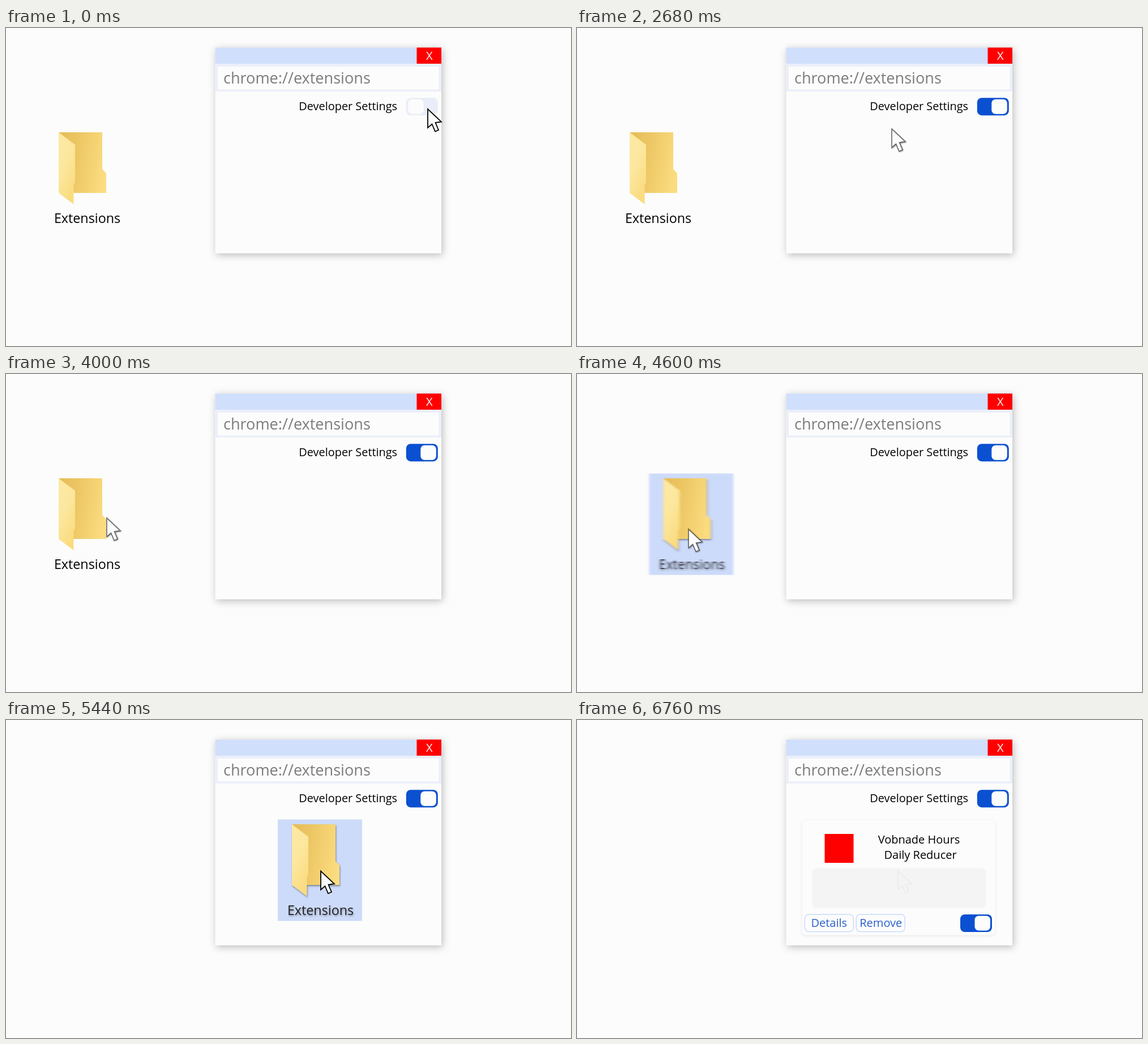
These frames come from a looping animation (998 by 561 pixels, 9600 ms). An HTML page:

```html
<!DOCTYPE html>
<html lang="en">
<head>
<meta charset="utf-8">
<title>Installing an extension</title>
<style>
  html, body { margin: 0; width: 100%; height: 100%; overflow: hidden; background: #fcfcfc; }
  svg { display: block; width: 998px; height: 561px; --track: #0b50d0; --shift: 0; }
  text { font: 20px "Open Sans", "Noto Sans", sans-serif; fill: #000; }
  .mid { text-anchor: middle; }
  .button rect { fill: #fcfcfc; stroke: #c8dbf9; stroke-width: 1.5; }
  .button text { fill: #2a5fcb; }
  .off { --track: #e9edf7; --shift: -22px; }
  .track { fill: var(--track); }
  .knob { fill: #fcfcfc; transform: translateX(var(--shift)); }
  .window { filter: drop-shadow(2px 3px 7px rgba(0, 0, 0, .26)); }
  .card-base { fill: #fcfcfc; filter: drop-shadow(0 1px 2px rgba(0, 0, 0, .09)); }
  .dragged .icon { filter: drop-shadow(1.5px 2px 1.5px rgba(0, 0, 0, .4)); }
  .dragged text { fill: #222; filter: drop-shadow(1px 2px 1.5px rgba(0, 0, 0, .35)) blur(.4px); }
  .moving { filter: drop-shadow(1.5px 1px 1.2px rgba(0, 0, 0, .45)); stroke-opacity: .5; }
</style>
</head>
<body>
<svg viewBox="0 0 998 561">
  <defs>
    <linearGradient id="back" x1="0" y1=".4" x2="1" y2=".6">
      <stop offset="0" stop-color="#e7bd59"/>
      <stop offset=".4" stop-color="#eec866"/>
      <stop offset="1" stop-color="#fbdd80"/>
    </linearGradient>
    <linearGradient id="flap" x1="0" y1="0" x2=".5" y2="1">
      <stop offset="0" stop-color="#fde9a4"/>
      <stop offset=".5" stop-color="#fce79e"/>
      <stop offset="1" stop-color="#fadc80"/>
    </linearGradient>
    <filter id="smear" x="-10%" y="-5%" width="120%" height="110%">
      <feGaussianBlur id="smearBlur" stdDeviation="0 0"/>
    </filter>
    <g id="toggle">
      <rect class="track" width="56" height="31" rx="8"/>
      <rect class="knob" x="25.500" y="2.500" width="27.500" height="26" rx="7"/>
    </g>
  </defs>

  <rect width="998" height="561" fill="#fcfcfc"/>

  <rect class="window" x="369.500" y="34.500" width="399.500" height="363" fill="#fcfcfc"/>
  <rect x="369.500" y="34.500" width="399.500" height="28.500" fill="#d0dffb"/>
  <rect x="725.500" y="34.500" width="43.500" height="28.500" fill="#f00"/>
  <text class="mid" x="747.800" y="55.500" style="fill:#fff">X</text>
  <rect x="369.500" y="63" width="399.500" height="49" fill="#ebeffa"/>
  <rect x="374" y="68" width="390.500" height="40.500" fill="#fcfcfc"/>
  <text x="384" y="98.300" style="font-size:27.1px;fill:#7c7c7c">chrome://extensions</text>
  <text x="517.300" y="144.500" style="font-size:19.9px">Developer Settings</text>
  <use id="devToggle" class="off" href="#toggle" x="706.800" y="123.200"/>

  <g id="folder">
    <rect id="selection" x="68" y="175.500" width="149" height="179" fill="#cad9fa" fill-opacity=".93"/>
    <g class="icon">
      <path d="M93 184H170V249L177 256V291H93Z" fill="url(#back)"/>
      <path d="M93 184L122 206V272L119.500 277V311L93 291Z" fill="url(#flap)"/>
    </g>
    <text class="mid" x="143.500" y="343.500" style="font-size:23.3px">Extensions</text>
  </g>

  <g id="card">
    <rect class="card-base" x="397.500" y="176.500" width="341" height="203" rx="8"/>
    <rect x="437.500" y="201" width="51" height="51" fill="#f00"/>
    <text class="mid" x="604" y="217.500">Vobnade Hours</text>
    <text class="mid" x="606.500" y="244.700">Daily Reducer</text>
    <rect x="415" y="261.500" width="307.500" height="70.500" rx="7" fill="#f4f4f4"/>
    <g class="button">
      <rect x="402.300" y="343" width="86" height="30.500" rx="7"/>
      <text class="mid" x="445.300" y="364.500">Details</text>
    </g>
    <g class="button">
      <rect x="493.300" y="343" width="86" height="30.500" rx="7"/>
      <text class="mid" x="536.800" y="364.500">Remove</text>
    </g>
    <use href="#toggle" x="677" y="343"/>
  </g>

  <g id="cursor">
    <path id="arrow" d="M0 0V33L7.500 26.500L13 39.500L19 37L13.500 24L24 22.500Z"
      fill="#fcfcfc" stroke="#000" stroke-width="1.8"/>
  </g>
</svg>
<script>
const LOOP = 9600, STEP = 40;
const $ = id => document.getElementById(id);

// Rows are [time, value...]
const cursorPath = [
  [1520, 745, 143], [2400, 627, 165], [2680, 556, 178], [3400, 345, 219],
  [4000, 178, 254], [4300, 139, 274], [4440, 150, 274], [4960, 374, 273],
  [5440, 556, 266.5], [5600, 567, 266]
];
const dragPath = [[4300, 0], [4440, 12], [4960, 233], [5440, 412], [5600, 423]];

// Smooth curve through the rows that never overshoots.
function sample(rows, t, col) {
  const last = rows.length - 1;
  if (t <= rows[0][0]) return rows[0][col];
  if (t >= rows[last][0]) return rows[last][col];
  const slope = i => (rows[i + 1][col] - rows[i][col]) / (rows[i + 1][0] - rows[i][0]);
  const tangent = i => {
    if (i === 0 || i === last) return 0;
    const a = slope(i - 1), b = slope(i);
    return a * b > 0 ? 2 * a * b / (a + b) : 0;
  };
  let i = 0;
  while (t > rows[i + 1][0]) i++;
  const span = rows[i + 1][0] - rows[i][0];
  const u = (t - rows[i][0]) / span, v = 1 - u;
  return rows[i][col] * (1 + 2 * u) * v * v + tangent(i) * span * u * v * v
    + rows[i + 1][col] * (3 - 2 * u) * u * u - tangent(i + 1) * span * u * u * v;
}

function draw(time) {
  const t = Math.floor((time % LOOP) / STEP) * STEP;
  const dragging = t >= 4300;
  const drag = sample(dragPath, t, 1);
  const speed = (sample(dragPath, t + 20, 1) - sample(dragPath, t - 20, 1)) / STEP;
  const fade = Math.min(1, Math.max(0, (t - 6080) / 680));

  $('devToggle').setAttribute('class', t < 1440 ? 'off' : '');

  const folder = $('folder');
  folder.setAttribute('transform', `translate(${drag} 0)`);
  folder.setAttribute('class', dragging ? 'dragged' : '');
  folder.setAttribute('visibility', fade < 1 ? 'visible' : 'hidden');
  $('selection').setAttribute('visibility', dragging && fade < 1 ? 'visible' : 'hidden');
  $('smearBlur').setAttribute('stdDeviation', `${Math.max(.01, speed * 4.5)} 0.01`);
  if (speed > .15) folder.setAttribute('filter', 'url(#smear)');
  else folder.removeAttribute('filter');

  $('card').setAttribute('opacity', fade);
  $('cursor').setAttribute('transform',
    `translate(${sample(cursorPath, t, 1)} ${sample(cursorPath, t, 2)})`);
  $('cursor').setAttribute('opacity', Math.max(.03, 1 - fade));
  $('arrow').setAttribute('class', t >= 1560 && t < 5400 ? 'moving' : '');
}

const start = performance.now();
function tick() {
  draw(performance.now() - start);
  requestAnimationFrame(tick);
}
tick();
</script>
</body>
</html>
```
